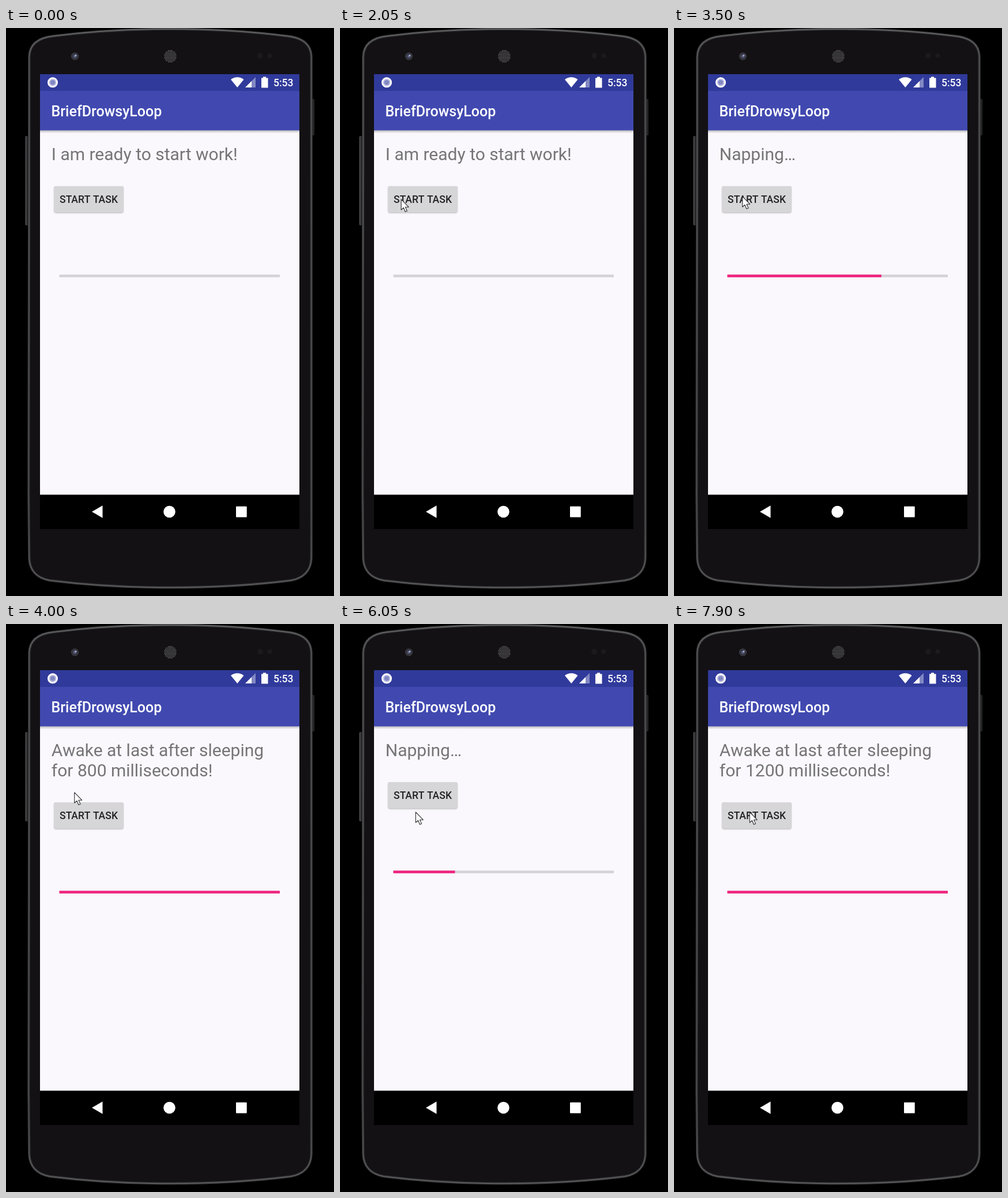
Animation of 569x984 px, one loop 8 s. Source, as an HTML page:

```html
<!DOCTYPE html>
<html lang="en">
<head>
<meta charset="utf-8">
<title>Nap timer on a phone</title>
<style>
  html, body { margin: 0; width: 100%; height: 100%; overflow: hidden; background: #000; }
  svg { display: block; width: 100%; height: 100%; }
  text { font-family: Roboto, "Noto Sans", sans-serif; }
  .medium { font-weight: 500; }
  .message { font-size: 30px; fill: #757477; }
  .label { font-size: 17.5px; fill: #222124; letter-spacing: .1px; word-spacing: 1px; }
</style>
</head>
<body>
<svg viewBox="0 0 569 984">
  <defs>
    <linearGradient id="rim" x1="0" y1="0" x2="0" y2="1">
      <stop offset="0" stop-color="#626264"/>
      <stop offset=".06" stop-color="#525254"/>
      <stop offset=".9" stop-color="#4a4a4c"/>
      <stop offset="1" stop-color="#5a5a5c"/>
    </linearGradient>
    <linearGradient id="key">
      <stop offset="0" stop-color="#58585a"/>
      <stop offset=".5" stop-color="#2b2b2d"/>
      <stop offset="1" stop-color="#161618"/>
    </linearGradient>
    <linearGradient id="shade" x1="0" y1="0" x2="0" y2="1">
      <stop offset="0" stop-color="#000" stop-opacity=".24"/>
      <stop offset="1" stop-color="#000" stop-opacity="0"/>
    </linearGradient>
    <radialGradient id="lens">
      <stop offset="0" stop-color="#6f7694"/>
      <stop offset=".4" stop-color="#464a63"/>
      <stop offset=".7" stop-color="#2c2c36"/>
      <stop offset="1" stop-color="#48484c"/>
    </radialGradient>
    <filter id="soft" x="-10%" y="-20%" width="120%" height="150%">
      <feGaussianBlur stdDeviation="1"/>
    </filter>
    <path id="body" d="M40.3 50C40.8 29 55 17 82 14C145 6 215 1.8 285 1.8C355 1.8 425 6 488 14
      C515 17 529.2 29 529.7 50V918C529.2 939 517 953 494 957C430 965 355 969.3 285 969.3
      C215 969.3 140 965 76 957C53 953 40.8 939 40.3 918L39.3 810L40.3 187Z"/>
  </defs>

  <!-- phone body -->
  <rect x="33.5" y="187" width="6" height="155" rx="2" fill="url(#key)"/>
  <rect x="529.5" y="123" width="6" height="63" rx="2" fill="url(#key)"/>
  <use href="#body" fill="#131114" stroke="#2e2e30" stroke-width="4.4"/>
  <use href="#body" fill="none" stroke="url(#rim)" stroke-width="2"/>
  <circle cx="119.5" cy="49" r="6.5" fill="url(#lens)"/>
  <circle cx="121" cy="47.5" r="1.5" fill="#a9b0d0"/>
  <circle cx="285" cy="49" r="11.3" fill="#201f22"/>
  <g id="speaker" fill="#727174"/>
  <g fill="#1d1a1c"><circle cx="441" cy="48" r="5"/><circle cx="457.5" cy="48" r="4"/></g>

  <!-- app -->
  <rect x="59" y="80" width="450" height="729" fill="#faf8fc"/>
  <rect x="59" y="80" width="450" height="29.5" fill="#303a9b"/>
  <rect x="59" y="109" width="450" height="68.4" fill="#4149b0"/>
  <rect x="59" y="177.4" width="450" height="5" fill="url(#shade)"/>
  <circle cx="81" cy="94.3" r="7.6" fill="#b4b7de" stroke="#fff" stroke-width="2.9"/>
  <circle cx="81" cy="94.3" r="4" fill="#8288c2"/>
  <g fill="#fff">
    <path d="M401.3 103L390 89.3C396.5 84 406 84 412.5 89.3Z"/>
    <path d="M415 103L433 85V103Z" opacity=".4"/>
    <path d="M415 103L426 92V103Z"/>
    <path d="M446 84.5H451V86.5H454.5V103.5H443V86.5H446Z"/>
    <text class="medium" x="464" y="101" font-size="17.5">5:53</text>
    <text class="medium" x="78.5" y="153" font-size="25">BriefDrowsyLoop</text>
  </g>

  <text class="message" id="line1" x="78.8" y="229"></text>
  <text class="message" id="line2" x="78.8" y="264"></text>

  <g id="content">
    <rect x="83.5" y="275" width="120" height="45.5" rx="3" fill="#000" opacity=".28" filter="url(#soft)"/>
    <rect id="button" x="83" y="274" width="121" height="45.5" rx="2.5"/>
    <text class="medium label" x="93" y="303">START TASK</text>
    <rect x="92.5" y="427.2" width="382.5" height="4.6" fill="#d5d3d7"/>
    <rect id="bar" x="92.5" y="427.2" height="4.6" fill="#f0257f"/>
  </g>

  <!-- navigation -->
  <rect x="59" y="808.5" width="450" height="59.5" fill="#000"/>
  <g fill="#fff">
    <path d="M149 838L167.5 827.3V848.7Z"/>
    <circle cx="283.5" cy="838" r="10.3"/>
    <rect x="399" y="828.7" width="18.7" height="18.7" rx="1"/>
  </g>

  <path id="cursor" fill="#fff" stroke="#2a2a2e" stroke-width="1.1" stroke-linejoin="round"
    d="M.8 .8V19L4.9 15.3L7.9 22.3L11 20.9L8 14.2H13.7Z"/>
</svg>
<script>
const LOOP = 8000, STEP = 50, BAR_WIDTH = 382.5, LINE = 35;
const $ = id => document.getElementById(id);

const progress = [[2400, 0], [2650, .16], [3950, .984], [4000, 1], [5350, 1],
  [5400, .012], [6900, .63], [7850, .99], [7900, 1]];
const press = [[2250, 0], [2400, 1], [2700, 1], [3050, 0]];
const cursorX = [[500, 18], [700, 72], [900, 105], [1050, 105], [1100, 109],
  [1750, 6], [1800, 13], [1950, 80], [2100, 118], [4350, 118], [4550, 126], [4750, 130.5]];
const cursorY = [[500, 284], [900, 295], [1750, 334], [1800, 332],
  [1950, 306], [2100, 291], [4350, 291], [4550, 312], [4750, 325]];

const messages = [
  [0, 'I am ready to start work!'],
  [2400, 'Napping…'],
  [4000, 'Awake at last after sleeping', 'for 800 milliseconds!'],
  [5350, 'Napping…'],
  [7900, 'Awake at last after sleeping', 'for 1200 milliseconds!']
];

// Linear interpolation through [time, value] points, held at both ends
function track(points, t) {
  if (t <= points[0][0]) return points[0][1];
  for (let i = 1; i < points.length; i++) {
    const [t0, a] = points[i - 1], [t1, b] = points[i];
    if (t <= t1) return a + (b - a) * (t - t0) / (t1 - t0);
  }
  return points[points.length - 1][1];
}

function drawSpeaker() {
  let dots = '';
  for (let row = -4; row <= 4; row++) {
    for (let col = -4; col <= 4; col++) {
      const x = (col + (row & 1) / 2) * 2.7, y = row * 2.4;
      if (Math.hypot(x, y) < 10.6) dots += `<circle cx="${285 + x}" cy="${49 + y}" r=".8"/>`;
    }
  }
  $('speaker').innerHTML = dots;
}

function render(time) {
  const t = Math.floor(time % LOOP / STEP) * STEP;
  const [, first, second = ''] = messages.filter(m => m[0] <= t).pop();
  $('line1').textContent = first;
  $('line2').textContent = second;
  $('content').setAttribute('transform', `translate(0 ${second ? LINE : 0})`);
  $('bar').setAttribute('width', BAR_WIDTH * track(progress, t));

  const grey = Math.round(214 - 20 * track(press, t));
  $('button').setAttribute('fill', `rgb(${grey},${grey - 1},${grey + 1})`);

  const shown = (t >= 500 && t < 1150) || t >= 1800;
  $('cursor').setAttribute('visibility', shown ? 'visible' : 'hidden');
  $('cursor').setAttribute('transform', `translate(${track(cursorX, t)} ${track(cursorY, t)})`);
}

drawSpeaker();
render(0);
const start = performance.now();
function tick() {
  render(performance.now() - start);
  requestAnimationFrame(tick);
}
requestAnimationFrame(tick);
</script>
</body>
</html>
```
